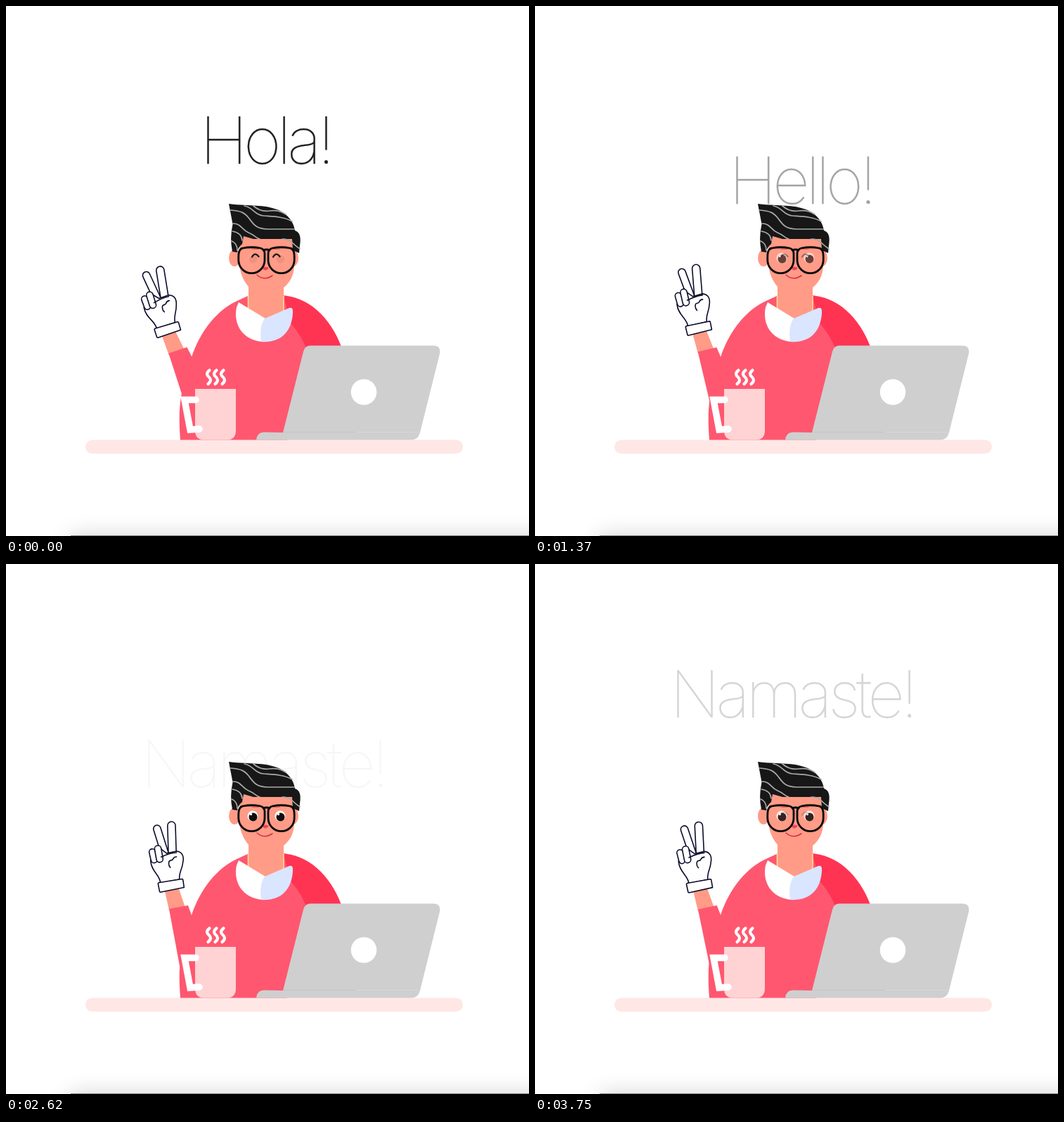
An HTML page that plays this animation: 744x753 px, repeating every 3.88 s.

```html
<!DOCTYPE html>
<html lang="en">
<head>
<meta charset="utf-8">
<title>Greetings</title>
<style>
html, body { margin: 0; width: 100%; height: 100%; overflow: hidden; background: #fff; }
svg { display: block; width: 744px; height: 753px; overflow: hidden; }
#word { font: 100 92px Inter, Roboto, sans-serif; letter-spacing: -.06em; fill: #111; stroke: #111; stroke-width: .4; }
.line { fill: none; stroke-linecap: round; stroke-linejoin: round; }
.ink { fill: #fff; stroke: #0d0c2b; stroke-width: 1.6; stroke-linejoin: round; stroke-linecap: round; }
</style>
</head>
<body>
<svg viewBox="0 0 744 753">
  <filter id="blur" x="-20%" width="140%" y="-100%" height="300%"><feGaussianBlur stdDeviation="16"/></filter>
  <rect x="92" y="752" width="720" height="60" opacity=".17" filter="url(#blur)"/>
  <rect x="92" y="752" width="652" height="1" fill="#8a8a8a"/>

  <text id="word"></text>
  <rect x="113" y="616.5" width="537" height="19.5" rx="9.75" fill="#ffe7e6"/>

  <!-- sweater -->
  <path fill="#ff3453" d="M390 411C430 412 461 442 477 484L425 500L400 440Z"/>
  <path fill="#ff5770" d="M248 616.5C246 590 246 570 250 550L264 499C276 462 301 430 333 417L346 411H394L406 452Q420 468 428 488L400 616.5Z"/>

  <!-- waving arm -->
  <g id="arm">
    <path fill="#ff9b86" d="M226 464L246 461L255 488L232 492Z"/>
    <path fill="#ff5770" d="M232 490L259 485L264 499L282 560L247 573Z"/>
    <g id="fingers"></g>
    <path class="ink" d="M220 453C219 441 207 437 206 421L213 409L220 404L229 411L243 408C251 409 254 415 252 424C251 434 246 438 247 448Z"/>
    <g id="fist"></g>
    <path class="ink" style="fill:none" d="M221 416C228 413 236 410 243 410M243 416C236 416 240 421 235 421C231 421 231 428 234 431"/>
    <path class="ink" d="M217.5 452.5L250.5 447.5Q252 447.5 252 449L253.5 459.5L220 466Q218.5 466 218.5 464.5L216.5 454Z"/>
  </g>

  <!-- mug -->
  <path fill="#ffd3d4" d="M269 544H327V603Q327 616.5 314 616.5H282Q269 616.5 269 603Z"/>
  <path fill="none" stroke="#fff" stroke-width="9.5" stroke-linecap="round" d="M270 559.5H254L262 602L275 601"/>
  <g id="steam" class="line" stroke="#fff" stroke-width="4.2"></g>

  <!-- laptop -->
  <path fill="#cfcfcf" d="M394 606L423 491Q425 482.5 433 482.5H608Q619 482.5 617 494L589 606Q586 616.5 577 616.5H356Q357 605.5 367 605.5Z"/>
  <path stroke="#c2c2c2" stroke-width=".8" d="M394 605.5H498"/>
  <path stroke="#dadada" stroke-width=".8" d="M498 605.5H588"/>
  <circle cx="509" cy="548.5" r="18.3" fill="#fff"/>

  <!-- neck and collar -->
  <path fill="#ff9b86" d="M345 385H395V434L369 446L345 432Z"/>
  <path stroke="#ffe08c" stroke-width="1.6" d="M344.5 412V431M395 412V433"/>
  <path fill="#fff" d="M331 421L369 444L364 477C336 474 323 452 328 428Z"/>
  <path fill="#dae5ff" d="M368 444L403 429Q409 427 408 437C406 463 391 479 363 477Q360 455 368 444Z"/>

  <!-- head -->
  <g fill="#ff9b86">
    <ellipse cx="325" cy="358" rx="8" ry="12"/>
    <ellipse cx="408" cy="358" rx="8" ry="12"/>
    <path d="M332 322V368C334 386 342 395 346 400Q370 411 395 400C404 393 410 382 410 368V322Z"/>
  </g>
  <path fill="#171717" d="M317 281C350 285 365 281 388 290Q408 300 411 319Q421 322 418 340L417 351L408 347L407 331H352L338 327L336 338Q330 343 329 350L322 349Q318 330 322.5 310Z"/>
  <g class="line" stroke="#a9a9a9" stroke-width="1.7">
    <path d="M319 290C335 291 340 294 346 302S356 317 372 317H410"/>
    <path d="M339 284C352 286 353 297 366 298S395 299 407 306"/>
    <path d="M352 284Q362 293 375 291T398 296"/>
    <path d="M323 309C335 309 335 318 345 322S355 330 361 331"/>
    <path d="M322 320Q335 322 336 333M321 334Q329 337 329 347"/>
    <path d="M393 331Q402 331 407 336T418 345"/>
  </g>
  <path class="line" stroke="#e8604f" stroke-width="1.2" d="M350 345.5H359M380 345.5H389"/>

  <g id="open"></g>
  <path id="shut" class="line" stroke="#141414" stroke-width="2.3" d="M350 356.5Q354 349 359.5 356M380 356.5Q384.5 349 389.5 356"/>

  <path fill="#f2405a" d="M364 372Q369 369 374 372Q369 379 364 372Z"/>
  <path class="line" stroke="#dd2f4c" stroke-width="1.6" d="M357 382Q367 391 379 383"/>
  <g class="line" stroke="#0a0a0a" stroke-width="2.8">
    <path id="lens" d="M330.8 361C330.5 352 331 345 337 344Q349 341.5 362 344Q368 345.5 368 352V361A18.6 18.6 0 0 1 330.8 361Z"/>
    <use href="#lens" transform="translate(741 0) scale(-1 1)"/>
    <path d="M366 347Q370.5 345 375 347"/>
  </g>
</svg>
<script>
const $ = id => document.getElementById(id);

// A finger is a round-capped stroke with a thinner white one on top.
const finger = (d, w) =>
  `<path class="line" d="${d}" stroke="#0d0c2b" stroke-width="${w}"/>` +
  `<path class="line" d="${d}" stroke="#fff" stroke-width="${w - 3.2}"/>`;
$('fingers').innerHTML = finger('M215.5 376L226 410', 12) + finger('M236 371.5L237 410', 12.8);
$('fist').innerHTML = finger('M208.5 409L211 420', 10.5) + finger('M216.5 404.5L219 419', 11);

$('steam').innerHTML = [289.5, 299.5, 309.5].map(x =>
  `<path d="M${x} 517.5c-5 4 -4 7 -1 9.5s4 6 -1 10"/>`).join('');

$('open').innerHTML = [351.5, 390.5].map(x =>
  `<circle cx="${x - .5}" cy="358" r="7.6" fill="#fff"/>
   <circle cx="${x}" cy="359.5" r="6" fill="#0a0a0a"/>
   <circle cx="${x - 3}" cy="355.5" r="1.7" fill="#fff"/>`).join('');

const LOOP = 3880, STEP = LOOP / 31, MOVE = 600;
const words = [
  { text: 'Hola!', x: 276, rise: -498, leave: 280, sinks: true },
  { text: 'Hello!', x: 276, rise: 1118, leave: 1811 },
  { text: 'Namaste!', x: 192, rise: 2553, leave: 3330 }
];

function ease(u) {
  u = Math.min(1, Math.max(0, u));
  const a = u ** 1.75, b = (1 - u) ** 1.75;
  return a / (a + b);
}

function draw(t) {
  const w = words.findLast(w => t >= w.rise);
  const p = ease((t - w.rise) / MOVE) - ease((t - w.leave) / MOVE);
  const y = t > w.leave && !w.sinks ? 218 : 320 - 102 * p;
  const word = $('word');
  word.textContent = w.text;
  word.setAttribute('x', w.x);
  word.setAttribute('y', y);
  word.setAttribute('opacity', p);
  $('arm').setAttribute('transform', `rotate(${-8.2 * p} 257 497)`);
  $('open').setAttribute('opacity', 1 - p);
  $('shut').setAttribute('opacity', p);
}

// The picture advances in 31 equal steps per loop; the offset absorbs timer rounding.
function tick() {
  const t = performance.now() % LOOP;
  draw(Math.floor((t + 10) / STEP) % 31 * STEP);
  requestAnimationFrame(tick);
}
tick();
</script>
</body>
</html>
```
